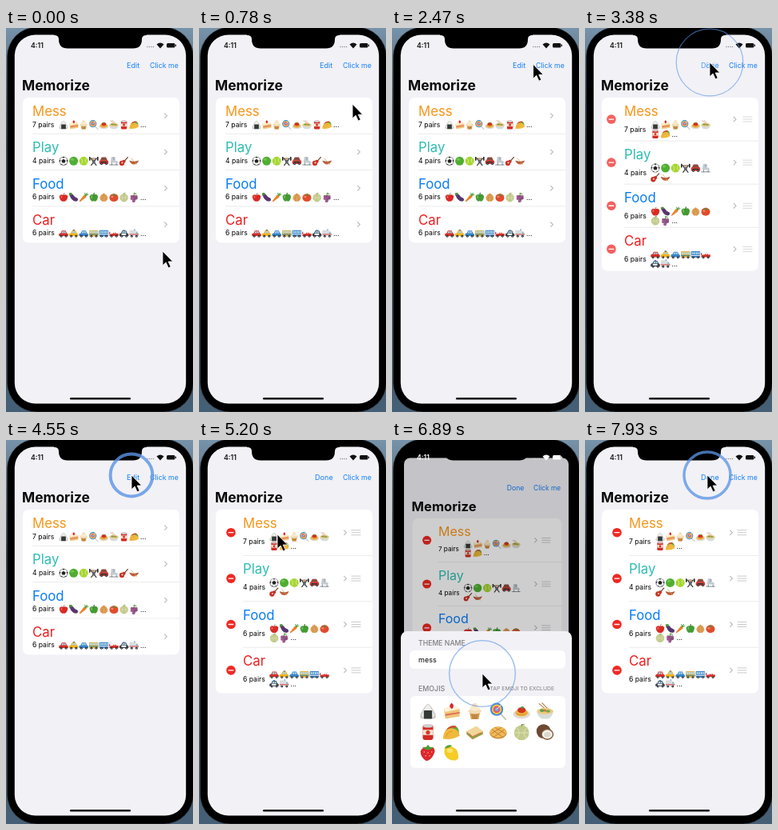
Write an HTML page that moves like this. It is 234x480 px and loops after 8 s.

```html
<!DOCTYPE html>
<html lang="en">
<head>
<meta charset="utf-8">
<title>Memorize</title>
<style>
html, body { margin: 0; width: 100%; height: 100%; overflow: hidden; background: #34434f; }
svg { display: block; width: 234px; height: 480px; font-family: Inter, "Liberation Sans", sans-serif; }
.blue { fill: #1580f5; }
.gray { fill: #7d7d82; }
</style>
</head>
<body>
<svg id="stage" viewBox="0 0 234 480"></svg>
<script>
const LOOP = 8000, STEP = 130;

// Shape helpers
const oval = (x, y, rx, ry, fill) => `<ellipse cx="${x}" cy="${y}" rx="${rx}" ry="${ry}" fill="${fill}"/>`;
const dot = (x, y, r, fill) => oval(x, y, r, r, fill);
const box = (x, y, w, h, r, fill) => `<rect x="${x}" y="${y}" width="${w}" height="${h}" rx="${r}" fill="${fill}"/>`;
const path = (d, fill) => `<path d="${d}" fill="${fill}"/>`;
const line = (d, color, w = 1) =>
  `<path d="${d}" fill="none" stroke="${color}" stroke-width="${w}" stroke-linecap="round" stroke-linejoin="round"/>`;
const text = (x, y, size, str, attrs = '') => `<text x="${x}" y="${y}" font-size="${size}" ${attrs}>${str}</text>`;
const group = (id, inner, attrs = '') => `<g id="${id}" ${attrs}>${inner}</g>`;

// Small pictures, each on a 24 x 24 grid
const wheels = dot(6.5, 18.5, 2.8, '#26282b') + dot(18, 18.5, 2.8, '#26282b') +
  dot(6.5, 18.5, 1.1, '#bbb') + dot(18, 18.5, 1.1, '#bbb');
const car = (color, extra = '') =>
  path('M1 18V13Q2 11 5 11L8 5H17L20 11Q23 12 23 14V18Z', color) +
  path('M7 11L9 6.5H12V11ZM13 11V6.5H16L18 11Z', '#a9d3e8') + extra + wheels;
const bus = (color, band) => box(1, 4, 22, 15, 2, color) +
  [3, 8, 13, 18].map(x => box(x, 6, 3.8, 5, .5, '#b4dcec')).join('') + box(1, 13, 22, 2, 0, band) + wheels;

const art = {
  onigiri: path('M12 2Q15 2 22 16Q24 22 19 22H5Q0 22 2 16Q9 2 12 2', '#c9c9c6') +
    path('M12 3Q14 3 20 16Q21 20 18 20H6Q3 20 4 16Q10 3 12 3', '#eeeeea') + box(6.5, 11, 11, 11, 1, '#343a38'),
  cake: path('M2 9L14 4L23 9V19L4 22Z', '#efc57a') + path('M2 9L14 4L23 9L4 13Z', '#fff3db') +
    path('M4 16L23 13V15L4 18Z', '#e46a55') + path('M12 1Q17 3 13 9Q7 6 12 1', '#d9262c'),
  cupcake: path('M5 13H19L17 22.5H7Z', '#d49a50') + line('M9 15L10 22M12 15V22M15 15L14 22', '#a9702f') +
    oval(12, 12, 9, 3.8, '#f3dcb4') + oval(12, 8, 6.5, 3.5, '#faebcd') + oval(12, 4, 3.5, 2.8, '#f5dfb9'),
  lollipop: line('M14 14L22 23', '#c9c4bd', 2) + dot(10, 9.5, 8.7, '#3f8edb') + dot(10, 9.5, 6.6, '#f6c53b') +
    dot(10, 9.5, 4.6, '#e8537d') + dot(10, 9.5, 2.4, '#57b6e5') + line('M10 9Q15 6 16 3', '#fff2d8', 1),
  pasta: oval(12, 16, 11.5, 6, '#dedbd5') + oval(12, 14, 8.5, 5, '#f0b545') +
    line('M5 15Q12 20 19 14', '#d58a26', 1) + oval(12, 10.5, 5.5, 4, '#cf3520') + oval(13, 7, 2, 1.4, '#4d9b3e'),
  bowl: line('M4 2L16 12M8 1L18 11', '#b58657', 1.2) + path('M1 12H23Q22 20 16 22H8Q2 20 1 12', '#d6dcda') +
    oval(12, 12, 11, 4.2, '#edca82') + oval(8, 11, 3, 2, '#58a54b') + oval(16, 12, 3, 1.8, '#6fae4e') + dot(12, 11, 1.8, '#dd6d44'),
  can: box(5, 2, 14, 20.5, 3, '#d22b25') + oval(12, 4, 7, 2.2, '#cfd2d4') + box(5, 9, 14, 7, 0, '#f1e5d2') + dot(12, 12.5, 2.8, '#d9392e'),
  taco: path('M3 14Q7 2 17 4Q23 6 22 15Z', '#69a83d') + line('M6 10Q10 4 17 5', '#d64730', 2.5) +
    path('M1 21Q1 8 12 7Q22 8 23 17Q13 23 1 21', '#f0b93e') + line('M5 18Q7 11 13 11', '#d99628', 1),
  sandwich: path('M1 11L14 4L23 11L9 18Z', '#f2d699') + path('M1 11L9 18V22L1 15Z', '#c98c46') +
    path('M9 18L23 11V15L9 22Z', '#d9a055') + line('M2 14L9 20L22 14', '#6ea73f', 1.5) + line('M5 14.5L9 18L20 13', '#d34a33', .8),
  waffle: oval(12, 13, 11.5, 8, '#c98632') + oval(12, 12, 11, 7.3, '#efba59') +
    line('M4 9L17 18M8 6L21 14M20 9L7 18M16 6L3 14', '#bd7a2b', 1),
  melon: dot(12, 13, 10, '#c3ca8c') + line('M6 7Q12 13 6 20M18 7Q12 13 18 20M3 13H21', '#e3e6c0', .9) +
    line('M12 4V2H15', '#8d9a55', 1.6),
  coconut: dot(10, 11, 9.5, '#6d4932') + oval(15, 15, 8.5, 7.5, '#80573a') + oval(15, 15, 7, 6, '#f5f1e7') + oval(15, 15.5, 4.4, 3.4, '#d9d9d0'),
  strawberry: path('M12 5Q22 3 21 11Q17 22 10 23Q2 18 2 10Q4 4 12 5', '#dd2730') +
    path('M4 5L10 4L12 1L14 4L20 5L14 8L10 8Z', '#4c9a35') +
    [[7, 11], [12, 12], [17, 11], [9, 16], [14, 16]].map(([x, y]) => dot(x, y, .8, '#f7ca71')).join(''),
  lemon: path('M4 4Q12 1 19 8Q22 14 21 20L18 22Q8 23 4 16Q1 10 4 4', '#f5cc26') + oval(10, 9, 4, 3, '#fbe36c') + path('M3 6Q6 0 13 2Q9 6 3 6', '#58a13b'),

  soccer: dot(12, 12, 10.5, '#4a4a4a') + dot(12, 12, 9.6, '#f3f3f3') + path('M12 7L17 11L15 16H9L7 11Z', '#222') +
    path('M9 2H15L12 5ZM2 10L5 9L4 15ZM22 10L19 9L20 15ZM7 19L10 21L6 21ZM17 19L14 21L18 21Z', '#222'),
  ball: dot(12, 12, 10.5, '#4fae32') + oval(9, 8, 4, 3, '#73c64c'),
  tennis: dot(12, 12, 10.5, '#a6d630') + line('M5 5Q13 11 6 20M19 4Q12 12 20 18', '#edf6c9', 1.2),
  lifter: line('M2 6H22', '#555', 1.6) + box(1, 2, 3, 9, 1, '#222') + box(20, 2, 3, 9, 1, '#222') + dot(12, 7, 2.8, '#cf9a6d') +
    line('M6 6L9 11H15L18 6M10 17L6 22M14 17L18 22', '#333', 2.2) + box(8.5, 10, 7, 8, 1, '#60656b'),
  kart: path('M3 11L7 3H17L21 11Z', '#8c4a3f') + box(1, 10, 22, 9, 3, '#d23a31') + box(5, 13, 14, 3, 1, '#38383b') + wheels,
  skate: path('M6 2H14V10Q21 11 22 16H4Z', '#c3cad2') + line('M2 21H22M7 17V21M18 17V21', '#5c6b76', 1.5) + line('M11 5H15M11 8H15', '#6c7c8b'),
  guitar: line('M12 13L21 3', '#6b4430', 2.4) + dot(7, 17, 6, '#c93126') + dot(12, 13, 4, '#c93126') + dot(8, 16, 2, '#f0d7b3'),
  canoe: path('M1 11Q12 16 23 11Q20 20 12 20Q4 20 1 11', '#c1603a') + line('M6 6L18 20', '#dda35a', 1.6) + line('M2 12Q12 17 22 12', '#8d4227'),

  apple: path('M12 7Q18 3 22 9Q22 19 15 22H9Q2 19 2 9Q6 3 12 7', '#d92a25') + oval(7, 11, 2, 3, '#ee6557') + line('M12 7Q12 3 14 2', '#67452a', 1.5),
  eggplant: path('M2 5Q6 1 11 6Q14 12 21 14Q25 20 18 22Q6 21 2 5', '#57356f') + path('M1 2L7 1L10 6L5 6L2 9Z', '#529342'),
  carrot: path('M13 6Q20 7 18 12L3 23Q1 22 3 19Z', '#ec8127') + line('M16 8L15 2M16 8L20 2M17 8L23 5', '#4d9f3b', 2),
  pepper: path('M12 6Q20 2 22 10Q21 20 16 22Q12 20 8 22Q3 19 2 10Q4 3 12 6', '#459b34') + line('M12 7L13 2', '#2c6d28', 2.3) + oval(7, 11, 1.6, 4, '#7fc05b'),
  onion: path('M12 2Q13 4 18 6Q26 16 16 22H8Q-2 16 6 6Q11 4 12 2', '#dfa058') + line('M12 6Q5 14 9 21M12 6Q19 14 15 21', '#c27f3c'),
  tomato: oval(12, 13, 10.5, 9.5, '#e04c2d') + oval(8, 11, 3, 2.3, '#f28466') + path('M6 6L11 6L12 2L14 6L19 6L13 9Z', '#4d933d'),
  grapes: [[7, 10], [12, 10], [17, 10], [9, 14], [14, 14], [12, 18], [7, 15], [17, 14], [11, 21]]
    .map(([x, y], i) => dot(x, y, 3.6, i % 2 ? '#874a7c' : '#a05d90')).join('') + line('M12 8V2L17 4', '#5a963d', 2),

  red: car('#d63129'), taxi: car('#efb521', box(10, 3, 5, 2, .5, '#444')), suv: car('#3a86cb'),
  bus: bus('#e3b451', '#3a8587'), trolley: bus('#3a83c8', '#e4edf2'),
  racer: path('M1 17L3 13L10 12L12 9H16L18 12H23V18H1Z', '#d7332b') + box(1, 8, 2, 6, 0, '#b4221e') + dot(14, 10, 2, '#eee') + wheels,
  police: car('#39464f', box(6, 12, 11, 4, 0, '#eef0f1') + box(10, 3, 4, 2, .5, '#3d7be0')),
  ambulance: box(1, 4, 15, 14, 1, '#d9dee0') + path('M16 7H20L23 12V18H16Z', '#cfd6d9') + path('M17 8H19.5L21 12H17Z', '#86b9d1') +
    box(1, 13, 22, 2, 0, '#da4a42') + box(12, 2, 3, 2, 0, '#3d7be0') + wheels,
};
const icon = (name, x, y, size) => `<use href="#${name}" x="${x - size / 2}" y="${y - size / 2}" width="${size}" height="${size}"/>`;

const words = s => s.split(' ');
const editorIcons = words('onigiri cake cupcake lollipop pasta bowl can taco sandwich waffle melon coconut strawberry lemon');
const themes = [
  { name: 'Mess', pairs: 7, color: '#f7971c', icons: editorIcons.slice(0, 8), more: true },
  { name: 'Play', pairs: 4, color: '#2fbdb3', icons: words('soccer ball tennis lifter kart skate guitar canoe') },
  { name: 'Food', pairs: 6, color: '#087cf8', icons: words('apple eggplant carrot pepper onion tomato melon grapes'), more: true },
  { name: 'Car', pairs: 6, color: '#ef1f20', icons: words('red taxi suv bus trolley racer police ambulance'), more: true },
];
const PITCH = 12.6, ICON = 12.6;

const row = (t, i) => group('row' + i,
  group('body' + i,
    text(0, 23, 16.8, t.name, `fill="${t.color}"`) +
    text(0, 0, 8.6, t.pairs + ' pairs', `id="pairs${i}"`) +
    t.icons.slice(0, 6).map((n, k) => icon(n, 39 + k * PITCH, 34, ICON)).join('') +
    group('tail' + i, icon(t.icons[6], 0, 0, ICON) + icon(t.icons[7], PITCH, 0, ICON) +
      (t.more ? text(20.5, 3, 8.6, '...') : ''))) +
  group('minus' + i, dot(0, 0, 5.8, '#ee2924') + line('M-2.8 0H2.8', '#fff', 1.3)) +
  group('chev' + i, line('M-1.4 -2.8L1.4 0L-1.4 2.8', '#b9b9be', 1.1)) +
  group('grip' + i, line('M-5.5 -3H5.5M-5.5 0H5.5M-5.5 3H5.5', '#c4c4c8', .9)) +
  (i ? `<path id="rule${i}" stroke="#e2e2e6" stroke-width=".7"/>` : ''));

const cardRect = id => `<rect id="${id}" x="21" y="87" width="196" rx="7" fill="#fff"/>`;

const listPage = box(10, 8, 216, 462, 8, '#f2f1f6') +
  text(151, 50, 9.1, 'Edit', 'id="edit" class="blue"') +
  text(145, 50, 9.1, 'Done', 'id="done" class="blue"') +
  text(180, 50, 8.8, 'Click me', 'id="clickMe"') +
  text(20, 78, 17.4, 'Memorize', 'font-weight="700" fill="#0b0b0c"') +
  cardRect('card') +
  `<g clip-path="url(#cardClip)">${themes.map(row).join('')}</g>` +
  '<rect id="dim" x="10" y="8" width="216" height="462" rx="8"/>';

const sheet = box(11, 40, 214, 450, 8, '#f2f1f6') +
  text(33, 58, 8.7, 'THEME NAME', 'class="gray" font-weight="500"') + box(22, 64, 195, 23, 6, '#fff') +
  text(33, 79, 9, 'mess') + text(33, 115, 8.8, 'EMOJIS', 'class="gray" font-weight="500"') +
  text(203, 114, 6.8, 'TAP EMOJI TO EXCLUDE', 'class="gray" text-anchor="end"') + box(23, 121, 194, 90, 6, '#fff') +
  editorIcons.map((n, k) => icon(n, 45 + k % 6 * 29.3, 140 + Math.floor(k / 6) * 26, 22.5)).join('');

const status = text(31, 25, 8.7, '4:11', 'font-weight="600"') +
  [177, 179.5, 182, 184.5].map(x => `<circle cx="${x}" cy="23.5" r=".7" opacity=".5"/>`).join('') +
  '<path d="M188.5 20.5Q193 16.5 197.5 20.5L193 25.5Z"/>' +
  '<rect x="201" y="19" width="10.5" height="5.5" rx="1.5"/><rect x="212" y="20.6" width="1" height="2.3" rx=".5"/>';

const stage = document.getElementById('stage');
stage.innerHTML = `<defs>
  ${Object.entries(art).map(([n, s]) => `<symbol id="${n}" viewBox="0 0 24 24">${s}</symbol>`).join('')}
  <clipPath id="screenClip"><rect x="10.8" y="8.5" width="214.4" height="461" rx="26"/></clipPath>
  <clipPath id="cardClip">${cardRect('cardMask')}</clipPath>
  <linearGradient id="wall" x2="0" y2="1"><stop stop-color="#7793a9"/><stop offset=".3" stop-color="#36495a"/><stop offset="1" stop-color="#456076"/></linearGradient>
  </defs>` +
  box(0, 0, 234, 480, 0, 'url(#wall)') +
  '<rect x="1.5" y="-1" width="233" height="481" rx="37" fill="#000" stroke="#3a4045" stroke-width=".7"/>' +
  `<g clip-path="url(#screenClip)">${group('list', listPage)}${group('sheet', sheet)}</g>` +
  path('M60 8H176V9Q170 9 170 14Q170 25.5 159 25.5H77Q66 25.5 66 14Q66 9 60 9Z', '#000') +
  group('status', status) + box(80, 462, 76, 2.6, 1.3, '#111') +
  '<circle id="ring" fill="none" stroke="#5a94e6"/>' +
  group('cursor', '<path d="M0 0V17.8L4.1 14L7.2 20.8L10.2 19.5L7.1 13H12.7Z" fill="#000" stroke="#fff" stroke-width=".8"/>');

const el = {};
stage.querySelectorAll('g[id], text[id], rect[id], path[id], circle[id]').forEach(n => el[n.id] = n);
const set = (id, attrs) => { for (const k in attrs) el[id].setAttribute(k, attrs[k]); };
const move = (id, x, y) => set(id, { transform: `translate(${x} ${y})` });

// Motion tables: [time, value, ...]; the sheet follows the cursor while it is dragged down
const SHEET_DROP = 440;
const editKeys = [[3150, 0], [3500, 1], [3910, 1], [4260, 0], [4670, 0], [5020, 1]];
const sheetKeys = [[5480, SHEET_DROP], [5950, 0], [6450, 0], [6850, 190], [7200, SHEET_DROP]];
const cursorKeys = [[250, 196, 279], [1000, 191, 47], [2250, 191, 47], [2750, 156, 43], [4250, 156, 43], [4400, 157, 44],
  [4620, 157, 44], [5150, 98, 118], [5500, 98, 118], [6000, 112, 102], [6450, 112, 102], [6850, 113, 292], [7000, 113, 292], [7600, 153, 44]];
const clicks = [1195, 1955, 2930, 3690, 4450, 5300, 6450, 7770];
const RING_MS = 500;

const mix = (a, b, p) => a + (b - a) * p;
const ease = u => u * u * (3 - 2 * u);
function track(keys, t) {
  const n = keys.findIndex(k => k[0] > t);
  if (n === 0) return keys[0].slice(1);
  if (n < 0) return keys[keys.length - 1].slice(1);
  const a = keys[n - 1], b = keys[n], p = ease((t - a[0]) / (b[0] - a[0]));
  return a.slice(1).map((v, i) => mix(v, b[i + 1], p));
}

function drawList(p) {
  const h = mix(45.3, 57.4, p), q = Math.min(1, p * 2), x = mix(33, 55, p);
  set('card', { height: h * 4 });
  set('cardMask', { height: h * 4 });
  set('edit', { opacity: 1 - p });
  set('done', { opacity: p });
  themes.forEach((t, i) => {
    move('row' + i, 0, 87 + i * h);
    move('body' + i, x, 0);
    set('pairs' + i, { y: mix(36.5, 43, q) });
    move('tail' + i, mix(39 + 6 * PITCH, 39, q), mix(34, 45.5, q));
    move('minus' + i, mix(14, 40, p), h / 2);
    move('chev' + i, mix(200, 183, p), h / 2);
    move('grip' + i, mix(222, 196.5, p), h / 2);
    set('minus' + i, { opacity: p });
    set('grip' + i, { opacity: p });
    if (i) set('rule' + i, { d: `M${x} 0H217` });
  });
}

function drawSheet(drop) {
  const s = 1 - drop / SHEET_DROP, k = mix(1, .915, s);
  set('list', { transform: `translate(${118 * (1 - k)} ${mix(0, 35 - 8 * k, s)}) scale(${k})` });
  set('dim', { opacity: s * .35 });
  move('sheet', 0, drop);
  set('status', { fill: s > .5 ? '#fff' : '#111' });
}

function drawPointer(t) {
  const [x, y] = track(cursorKeys, t);
  move('cursor', x, y);
  const hit = clicks.find(c => t >= c && t < c + RING_MS);
  if (!hit) return set('ring', { opacity: 0 });
  const p = (t - hit) / RING_MS;
  set('ring', { cx: x, cy: y, r: 22 + 22 * p, 'stroke-width': .8 + 4 * (1 - p), opacity: .85 - .25 * p });
}

function draw(t) {
  drawList(track(editKeys, t)[0]);
  drawSheet(track(sheetKeys, t)[0]);
  drawPointer(t);
  const red = t >= 1300 && t < 2060;
  set('clickMe', { fill: red ? '#f0302c' : '#1580f5', opacity: red && t < 1700 ? .45 : 1 });
}

const start = performance.now();
function tick() {
  const t = (performance.now() - start) % LOOP;
  draw(Math.floor(t / STEP) * STEP);
  requestAnimationFrame(tick);
}
tick();
</script>
</body>
</html>
```
